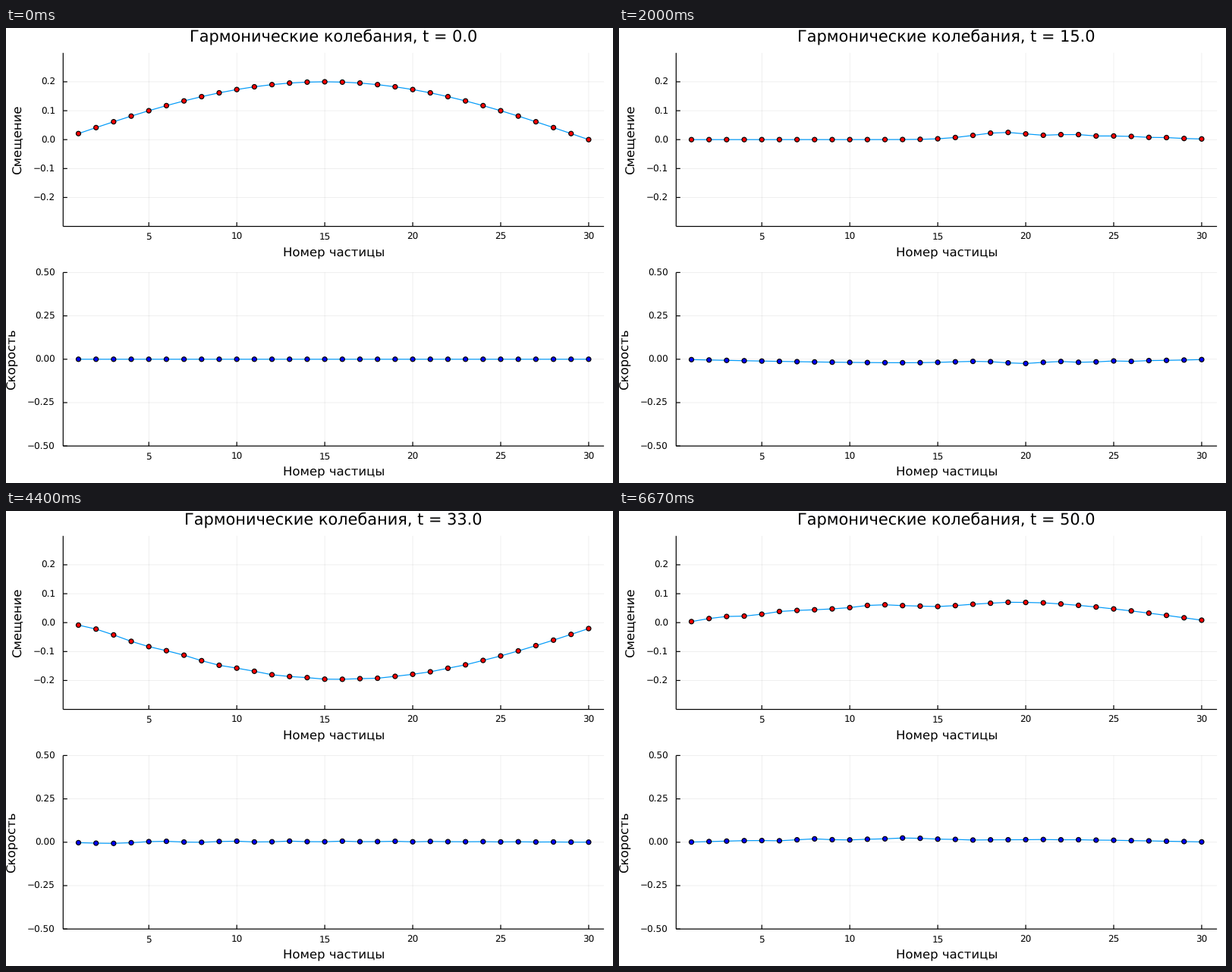
A matplotlib script that plays this animation: 800x600 px, repeating every 6740 ms.

```python
import numpy as np
import matplotlib.pyplot as plt
from matplotlib.animation import FuncAnimation

W, H, DPI = 800, 600, 100
PX = 72 / DPI               # points per pixel
N = 30                      # particles between two fixed walls
DT, FPS, STEPS = 0.5, 15, 101
LOOP_MS, TICK_MS = 6740, 20
LEFT, RIGHT = 75.3, 788.1
X0, X1 = 0.13, 30.87
LINE = 1.2                  # line width in pixels

plt.rcParams.update({"font.family": "DejaVu Sans", "text.hinting": "none"})

# Normal modes of a chain with unit mass and stiffness
idx = np.arange(1, N + 1)
modes = np.sqrt(2 / (N + 1)) * np.sin(np.pi * np.outer(idx, idx) / (N + 1))
omega = 2 * np.sin(np.pi * idx / (2 * (N + 1)))
amps = modes @ (0.2 * np.sin(np.pi * idx / N))


def chain(t):
    """Displacements and velocities at time t."""
    u = modes @ (amps * np.cos(omega * t))
    v = modes @ (-amps * omega * np.sin(omega * t))
    return u, v


# One axes over the whole stage, in pixels from the top left corner
fig = plt.figure(figsize=(W / DPI, H / DPI), dpi=DPI, facecolor="white")
ax = fig.add_axes([0, 0, 1, 1])
ax.set_xlim(0, W)
ax.set_ylim(H, 0)
ax.axis("off")


def text(x, y, s, size, ha="center", rotation=0):
    return ax.text(x, y, s, fontsize=size * PX, color="black", ha=ha,
                   va="baseline", rotation=rotation, rotation_mode="anchor")


def to_x(n):
    return LEFT + (n - X0) / (X1 - X0) * (RIGHT - LEFT)


class Panel:
    def __init__(self, top, bottom, ylim, yticks, fmt, ylabel, label_x, color):
        self.mid = (top + bottom) / 2
        self.scale = (bottom - top) / 2 / ylim
        xs = to_x(np.arange(5, 31, 5))
        ys = self.to_y(np.array(yticks))

        grid = dict(colors="black", alpha=0.1, lw=0.6 * PX, snap=False,
                    zorder=1)
        ax.vlines(xs, top, bottom, **grid)
        ax.hlines(ys, LEFT, RIGHT, **grid)

        edge = dict(colors="black", lw=LINE * PX, snap=False, zorder=2)
        ax.vlines(LEFT, top, bottom, **edge)
        ax.hlines(bottom, LEFT, RIGHT, **edge)
        ax.vlines(xs, bottom - 5.5, bottom, **edge)
        ax.hlines(ys, LEFT, LEFT + 5.5, **edge)

        for n, x in zip(range(5, 31, 5), xs):
            text(x, bottom + 17.2, str(n), 11.96)
        for v, y in zip(yticks, ys):
            text(64.8, y + 4.3, fmt.format(v).replace("-", "\u2212"), 11.96,
                 ha="right")
        text((LEFT + RIGHT) / 2, bottom + 39.6, "Номер частицы", 16.45)
        text(label_x, self.mid, ylabel, 16.45, rotation=90)

        self.x = to_x(idx)
        flat = np.full(N, self.mid)
        self.line, = ax.plot(self.x, flat, color="#009af9", lw=LINE * PX,
                             snap=False, zorder=3)
        # One width per dot keeps the dots at fractional pixel positions
        self.dots = ax.scatter(self.x, flat, s=(6 * PX) ** 2, c=color,
                               edgecolors="black",
                               linewidths=[LINE * PX] * N, zorder=4)

    def to_y(self, v):
        return self.mid - v * self.scale

    def show(self, values):
        y = self.to_y(values)
        self.line.set_ydata(y)
        self.dots.set_offsets(np.column_stack([self.x, y]))


shift = Panel(32.8, 261.6, 0.3, [-0.2, -0.1, 0.0, 0.1, 0.2], "{:.1f}",
              "Смещение", 21.0, "#ff0000")
speed = Panel(322.4, 551.2, 0.5, [-0.5, -0.25, 0.0, 0.25, 0.5], "{:.2f}",
              "Скорость", 13.0, "#0000ff")
title = text(431.7, 18.0, "", 20.93)


def update(frame):
    # Steps come at 15 per second, rounded to hundredths of a second
    ms = frame * TICK_MS + 15
    step = min(ms * FPS // 1000, STEPS - 1)
    t = step * DT
    u, v = chain(t)
    shift.show(u)
    speed.show(v)
    title.set_text(f"Гармонические колебания, t = {t:.1f}")
    return shift.line, shift.dots, speed.line, speed.dots, title


anim = FuncAnimation(fig, update, frames=LOOP_MS // TICK_MS, interval=TICK_MS,
                     init_func=lambda: update(0), repeat=True, repeat_delay=0)
plt.show()
```
